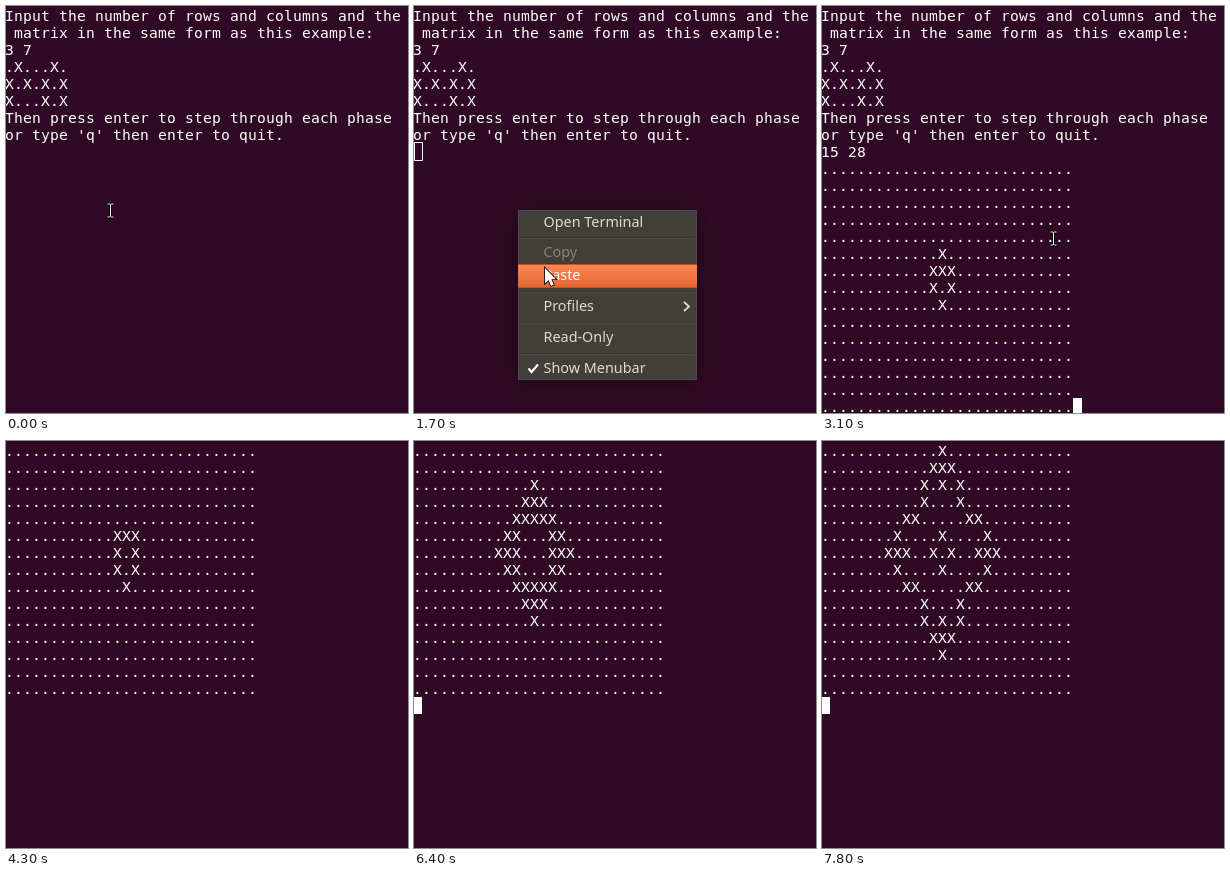
Recreate the animation shown at these times as an HTML page with a canvas. Size 402 by 407 pixels, loop 8 s.

```html
<!DOCTYPE html>
<html lang="en">
<head>
<meta charset="utf-8">
<style>
  html, body { margin: 0; width: 100%; height: 100%; overflow: hidden; background: #300a24; }
  canvas { display: block; }
</style>
</head>
<body>
<canvas id="stage" width="402" height="407"></canvas>
<script>
const ctx = document.getElementById('stage').getContext('2d');
const LOOP = 8000, ROWS = 15, COLS = 28, CELL_W = 9, CELL_H = 17;

const intro = [
  'Input the number of rows and columns and the',
  ' matrix in the same form as this example:',
  '3 7', '.X...X.', 'X.X.X.X', 'X...X.X',
  'Then press enter to step through each phase',
  "or type 'q' then enter to quit."
];

// Conway's Game of Life
const seed = { 5: '.X.', 6: 'XXX', 7: 'X.X', 8: '.X.' };
const firstGrid = Array.from({ length: ROWS }, (_, r) =>
  '.'.repeat(12) + (seed[r] || '...') + '.'.repeat(13));

function evolve(grid) {
  const alive = (r, c) => grid[r]?.[c] === 'X';
  return grid.map((line, r) => [...line].map((cell, c) => {
    let n = 0;
    for (let dr = -1; dr <= 1; dr++)
      for (let dc = -1; dc <= 1; dc++)
        if ((dr || dc) && alive(r + dr, c + dc)) n++;
    return n === 3 || (n === 2 && cell === 'X') ? 'X' : '.';
  }).join(''));
}

const enterTimes = [3700, 4600, 5000, 5400, 5700, 6000, 6400, 6800, 7100, 7500, 7800];
const generations = [firstGrid];
enterTimes.forEach(() => generations.push(evolve(generations.at(-1))));

const cellX = col => col * CELL_W - 1;
const cellY = row => row * CELL_H + 1;

function drawLines(lines) {
  ctx.font = '14.67px "DejaVu Sans Mono", monospace';
  ctx.fillStyle = '#fff';
  lines.forEach((line, r) => [...line].forEach((ch, c) =>
    ctx.fillText(ch, cellX(c), cellY(r) + 14)));
}

function drawBlock(row, col) {
  ctx.fillStyle = '#fff';
  ctx.fillRect(cellX(col), cellY(row), CELL_W, CELL_H);
}

function strokePath(path, color, width) {
  ctx.strokeStyle = color;
  ctx.lineWidth = width;
  ctx.stroke(new Path2D(path));
}

function drawIBeam(x, y) {
  ctx.save();
  ctx.translate(x + 0.5, y + 0.5);
  const beam = 'M-3 -6.5H-1L0 -6L1 -6.5H3M0 -6V6M-3 6.5H-1L0 6L1 6.5H3';
  strokePath(beam, '#000', 3);
  strokePath(beam, '#fff', 1);
  ctx.restore();
}

function drawArrow(x, y) {
  ctx.save();
  ctx.translate(x, y);
  const arrow = 'M0 0V15.5L3.6 12.3L6.2 18L8.8 16.8L6.3 11.3H11Z';
  strokePath(arrow, '#000', 1.6);
  ctx.fillStyle = '#fff';
  ctx.fill(new Path2D(arrow));
  ctx.restore();
}

const menu = { x: 104, y: 204, w: 179, h: 170 };
const items = [
  ['Open Terminal', 205], ['Copy', 235], ['Paste', 258],
  ['Profiles', 289], ['Read-Only', 320], ['Show Menubar', 351]
];

function drawMenu(hovered) {
  const { x, y, w, h } = menu;
  ctx.save();
  ctx.shadowColor = 'rgba(0,0,0,.4)';
  ctx.shadowBlur = 24;
  ctx.shadowOffsetY = 4;
  ctx.fillStyle = '#403f3a';
  ctx.fillRect(x, y, w, h);
  ctx.restore();
  strokePath(`M${x + 0.5} ${y + 0.5}h${w - 1}v${h - 1}h${1 - w}z`, '#4c4b45', 1);

  for (const sepY of [231, 285, 316, 347]) {
    ctx.fillStyle = '#373631';
    ctx.fillRect(x + 2, sepY, w - 4, 1);
    ctx.fillStyle = '#494841';
    ctx.fillRect(x + 2, sepY + 1, w - 4, 1);
  }

  ctx.font = '14.4px "Noto Sans", "Open Sans", sans-serif';
  for (const [label, top] of items) {
    if (label === hovered) {
      const glow = ctx.createLinearGradient(0, top, 0, top + 24);
      glow.addColorStop(0, '#f98a58');
      glow.addColorStop(1, '#e3642f');
      ctx.fillStyle = glow;
      ctx.fillRect(x, top, w, 24);
      ctx.fillStyle = '#c9501f';
      ctx.fillRect(x, top, w, 1);
      ctx.fillRect(x, top + 23, w, 1);
    }
    ctx.fillStyle = label === 'Copy' ? '#85837a' : label === hovered ? '#fff' : '#dfdbd2';
    ctx.fillText(label, 129.5, top + 16);
  }
  strokePath('M270 296L275 300.5L270 305', '#dfdbd2', 1.8);
  strokePath('M114.5 362.5L117.5 366L124 358.5', '#fff', 2.2);
}

// Pointer travel in six steps of 100 ms, the first one at `start`
function travel(t, start, from, to) {
  const k = Math.max(0, Math.min(6, Math.floor((t - start) / 100) + 1)) / 6;
  const e = k * k * (3 - 2 * k);
  return from.map((v, i) => Math.round(v + (to[i] - v) * e));
}

function drawPrompt(t) {
  if (t < 1900) {
    drawLines(intro);
    if (t < 1000) {
      if (t >= 100 && t < 700) drawBlock(8, 0);
      drawIBeam(104, 204);
      return;
    }
    strokePath('M.5 136.5h8v18h-8z', '#fff', 1);
    const [x, y] = travel(t, 1200, [103, 203], [131, 262]);
    const under = items.find(([label, top]) =>
      label !== 'Copy' && x >= menu.x && y >= top && y < top + 23);
    drawMenu(under?.[0]);
    drawArrow(x, y);
    return;
  }
  drawLines([...intro, '15 28', ...firstGrid]);
  if (t < 2500 || t >= 3100) drawBlock(23, 28);
  drawIBeam(...travel(t, 2100, [132, 263], [231, 232]));
}

function draw(now) {
  const t = now % LOOP;
  ctx.fillStyle = '#300a24';
  ctx.fillRect(0, 0, 402, 407);
  const generation = enterTimes.filter(time => t >= time).length;
  if (generation === 0) {
    drawPrompt(t);
  } else {
    drawLines(generations[generation]);
    if (t < 4300 || t >= 4600) drawBlock(ROWS, 0);
  }
  requestAnimationFrame(draw);
}
requestAnimationFrame(draw);
</script>
</body>
</html>
```
